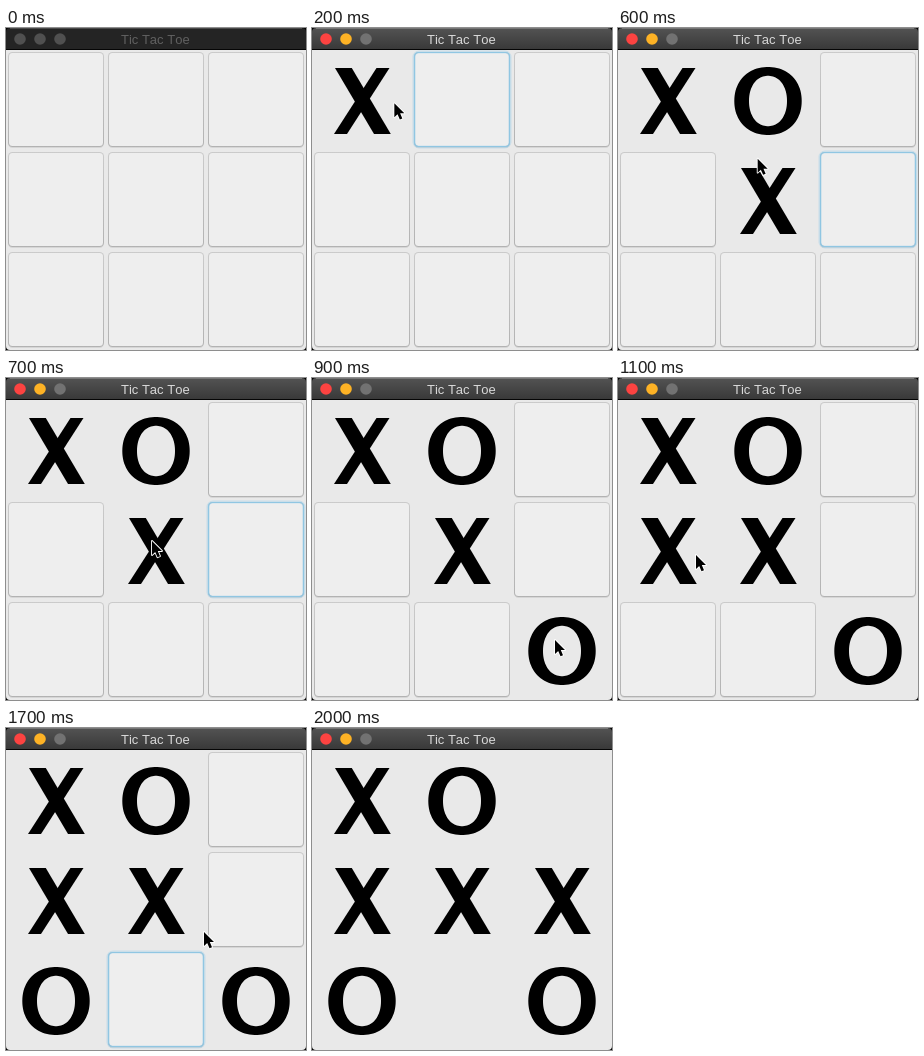
Recreate the animation shown at these times as an HTML page with a canvas. Size 300x322 px, loop 2.4 s.

```html
<!DOCTYPE html>
<html lang="en">
<head>
<meta charset="utf-8">
<title>Tic Tac Toe</title>
<style>
  html, body { margin: 0; width: 100%; height: 100%; overflow: hidden; background: #e9e9e9; }
  canvas { display: block; width: 300px; height: 322px; }
</style>
</head>
<body>
<canvas id="stage" width="300" height="322"></canvas>
<script>
const ctx = document.getElementById('stage').getContext('2d');
const LOOP = 2400, STEP = 100, LAST = 20;

// X and O alternate, starting with X.
const cells = [0, 1, 4, 8, 3, 6, 5];
const clicks = [2, 4, 6, 9, 11, 15, 18];
const wonAt = clicks.at(-1);

// Pointer stops: step, x, y. It glides evenly between them.
const stops = [
  [1, 60, 80], [4, 127, 66], [7, 146, 163], [9, 243, 262],
  [11, 78, 177], [14, 84, 246], [17, 198, 204], [18, 215, 186], [19, 254, 136]
];

function fillBox(x, y, w, h, r, color) {
  ctx.fillStyle = color;
  ctx.beginPath();
  ctx.roundRect(x, y, w, h, r);
  ctx.fill();
}

function strokeBox(x, y, w, h, r, width, color) {
  ctx.lineWidth = width;
  ctx.strokeStyle = color;
  ctx.beginPath();
  ctx.roundRect(x, y, w, h, r);
  ctx.stroke();
}

function fade(height, top, bottom) {
  const g = ctx.createLinearGradient(0, 0, 0, height);
  g.addColorStop(0, top);
  g.addColorStop(1, bottom);
  return g;
}

function button(focused) {
  fillBox(2, 3, 96, 95, 4.5, '#d6d6d6');
  fillBox(2, 2, 96, 95, 4.5, fade(97, '#cbcbcb', '#b2b2b2'));
  fillBox(3, 3, 94, 93, 3.5, '#eeeeee');
  if (!focused) return;
  strokeBox(2, 2, 96, 95, 5, 3, 'rgba(130,195,230,.3)');
  strokeBox(2.5, 2.5, 95, 94, 4, 1.2, '#90c6e2');
}

// A slanted bar from the top to the bottom of a letter.
function slant(top, bottom, width) {
  ctx.beginPath();
  ctx.moveTo(top, 18);
  ctx.lineTo(top + width, 18);
  ctx.lineTo(bottom + width, 84);
  ctx.lineTo(bottom, 84);
  ctx.fill();
}

// A slightly squared oval.
function oval(rx, ry) {
  const bend = v => Math.sign(v) * Math.abs(v) ** 0.94;
  for (let i = 0; i < 90; i++) {
    const a = i * Math.PI / 45;
    const x = 50 + rx * bend(Math.cos(a)), y = 51 + ry * bend(Math.sin(a));
    if (i) ctx.lineTo(x, y); else ctx.moveTo(x, y);
  }
  ctx.closePath();
}

function mark(isX) {
  ctx.fillStyle = '#000';
  if (isX) {
    slant(23, 62, 16.8);
    slant(64.5, 22, 13);
  } else {
    ctx.beginPath();
    oval(33.7, 34);
    oval(19, 25.2);
    ctx.fill('evenodd');
  }
}

function titleBar(active) {
  ctx.fillStyle = active ? fade(21, '#535353', '#393939') : '#242424';
  ctx.fillRect(0, 0, 300, 21);
  ctx.fillStyle = active ? '#777' : '#4a4a4a';
  ctx.fillRect(4, 0, 292, 1);
  ctx.fillStyle = '#050505';
  ctx.fillRect(0, 21, 300, 1);
  ['#fc4341', '#fdb225', '#727272'].forEach((color, i) =>
    fillBox(8.2 + 20 * i, 5.2, 11.6, 11.6, 5.8, active ? color : '#505050'));
  ctx.font = '13px "Liberation Sans", Arial, sans-serif';
  ctx.fontKerning = 'none';
  ctx.textAlign = 'center';
  ctx.fillStyle = active ? '#d8d8d8' : '#606060';
  ctx.fillText('Tic Tac Toe', 149.3, 16);
}

function corners() {
  ctx.fillStyle = '#000';
  ctx.beginPath();
  ctx.rect(0, 0, 300, 322);
  ctx.roundRect(0, 0, 300, 322, 4);
  ctx.fill('evenodd');
}

const arrow = new Path2D('M0 0V14L3.2 11L5.5 16.2L8 15.2L5.8 10H10Z');

function pointer(step) {
  const k = stops.findIndex(s => s[0] > step);
  const last = stops.at(-1);
  if (step < 1 || step > last[0]) return;
  const a = k < 0 ? last : stops[k - 1], b = k < 0 ? last : stops[k];
  const u = a === b ? 0 : (step - a[0]) / (b[0] - a[0]);
  ctx.save();
  ctx.translate(a[1] + (b[1] - a[1]) * u, a[2] + (b[2] - a[2]) * u);
  ctx.lineJoin = 'round';
  ctx.lineWidth = 1.8;
  ctx.strokeStyle = '#fff';
  ctx.stroke(arrow);
  ctx.fillStyle = '#000';
  ctx.fill(arrow);
  ctx.restore();
}

function render(step) {
  ctx.fillStyle = '#e9e9e9';
  ctx.fillRect(0, 0, 300, 322);
  const played = cells.filter((_, i) => step >= clicks[i]);
  // Focus passes to the cell after the last one played, if it is free.
  const next = played.length ? played.at(-1) + 1 : 0;
  for (let i = 0; i < 9; i++) {
    const turn = played.indexOf(i);
    ctx.save();
    ctx.translate(i % 3 * 100, 22 + Math.floor(i / 3) * 100);
    if (turn >= 0) mark(turn % 2 === 0);
    else if (step < wonAt) button(step > 0 && i === next);
    ctx.restore();
  }
  titleBar(step > 0);
  corners();
  pointer(step);
}

function tick() {
  const t = performance.now() % LOOP;
  render(Math.min(LAST, Math.floor(t / STEP)));
  requestAnimationFrame(tick);
}
tick();
</script>
</body>
</html>
```
